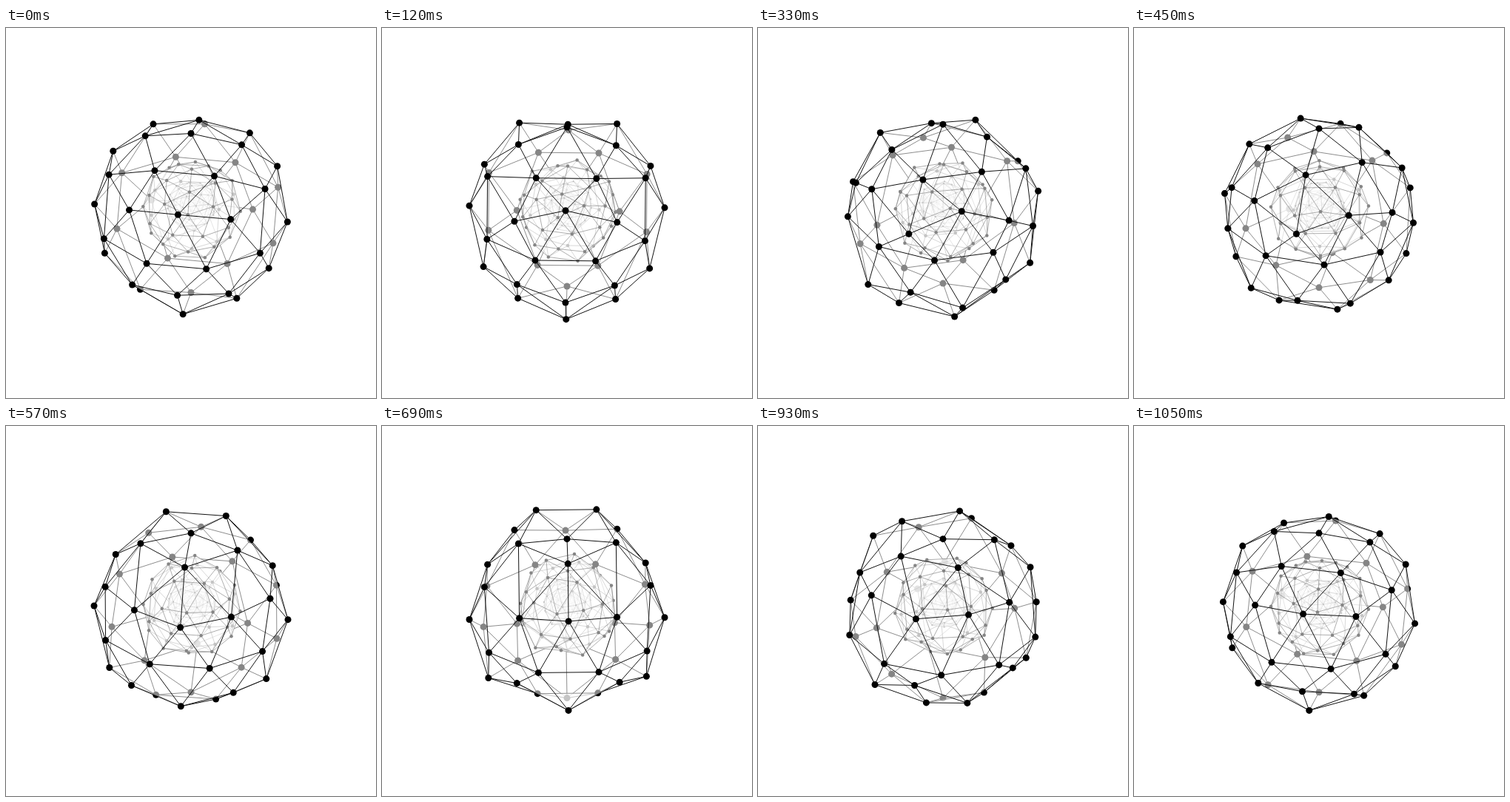
An HTML page with a canvas for the animation above (1.08 s loop, 500 by 500 pixels).

```html
<!DOCTYPE html>
<html>
<head>
<meta charset="utf-8">
<style>
  html, body { margin: 0; background: #fff; overflow: hidden; }
  canvas { display: block; }
</style>
</head>
<body>
<canvas id="stage" width="500" height="500"></canvas>
<script>
const ctx = document.getElementById('stage').getContext('2d');
const RAD = Math.PI / 180, STEP = 30, STEPS = 36;
const TILT = 35.5 * RAD, RADIUS = 132, WAVE = 13.2;

// Rings of a subdivided icosahedron: height, count, first azimuth, bob phase
const rings = [
  [1, 1, 0, 0], [-1, 1, 0, 0], [0, 10, 18, 0],
  [0.5257, 5, 0, 25], [-0.5257, 5, 36, 25],
  [0.8507, 5, 36, 205], [-0.8507, 5, 0, 205],
  [0.4472, 5, 36, 160], [-0.4472, 5, 0, 160]
];
const verts = rings.flatMap(([h, n, first, phase]) =>
  Array.from({ length: n }, (_, i) =>
    ({ h, r: Math.sqrt(1 - h * h), az: first + i * 360 / n, phase })));

function near(a, b) {
  const turn = Math.cos((a.az - b.az) * RAD);
  return a.h * b.h + a.r * b.r * turn > 0.77;
}

const edges = [], faces = [];
verts.forEach((a, i) => {
  for (let j = i + 1; j < verts.length; j++) {
    if (!near(a, verts[j])) continue;
    edges.push([i, j]);
    for (let k = j + 1; k < verts.length; k++)
      if (near(a, verts[k]) && near(verts[j], verts[k])) faces.push([i, j, k]);
  }
});

function project(v, s, spin, wave) {
  const a = (v.az + spin) * RAD, c = v.r * Math.cos(a);
  const up = v.h * Math.cos(TILT) - c * Math.sin(TILT);
  return {
    x: s.x + s.size * RADIUS * v.r * Math.sin(a),
    y: s.y - s.size * (RADIUS * up + WAVE * Math.sin((wave + v.phase) * RAD)),
    z: s.size * (v.h * Math.sin(TILT) + c * Math.cos(TILT)),
    top: -9
  };
}

function trace(points) {
  ctx.beginPath();
  points.forEach(p => ctx.lineTo(p.x, p.y));
}

// Collects drawable parts; edges and dots lie just above their nearest face
function addSphere(parts, s, step) {
  const spin = s.start + s.dir * 2 * step;
  const pts = verts.map(v => project(v, s, spin, step * 10));
  const tops = {};
  for (const f of faces) {
    const tri = f.map(i => pts[i]);
    const z = (tri[0].z + tri[1].z + tri[2].z) / 3;
    for (const [i, j] of [[f[0], f[1]], [f[1], f[2]], [f[0], f[2]]]) {
      const key = i + '-' + j;
      tops[key] = Math.max(tops[key] ?? -9, z);
    }
    tri.forEach(p => p.top = Math.max(p.top, z));
    parts.push({ z, draw() {
      trace(tri);
      ctx.fillStyle = 'rgba(255,255,255,.52)';
      ctx.fill();
    } });
  }
  for (const [i, j] of edges) {
    parts.push({ z: tops[i + '-' + j] + 1e-5, draw() {
      trace([pts[i], pts[j]]);
      ctx.lineWidth = Math.sqrt(s.size);
      ctx.strokeStyle = '#111';
      ctx.stroke();
    } });
  }
  for (const p of pts) {
    parts.push({ z: p.top + 2e-5, draw() {
      ctx.beginPath();
      ctx.arc(p.x, p.y, 4.5 * s.size, 0, 7);
      ctx.fillStyle = '#000';
      ctx.fill();
    } });
  }
}

const spheres = [
  { x: 250, y: 250, size: 1, start: -9, dir: 1 },
  { x: 251, y: 244.5, size: 0.5, start: 31, dir: -1 },
  { x: 251, y: 240, size: 0.25, start: 12, dir: 1 },
  { x: 251, y: 238, size: 0.125, start: 50, dir: -1 }
];

function frame(now) {
  const step = Math.floor(now / STEP) % STEPS;
  const parts = [];
  spheres.forEach(s => addSphere(parts, s, step));
  parts.sort((a, b) => a.z - b.z);
  ctx.fillStyle = '#fff';
  ctx.fillRect(0, 0, 500, 500);
  parts.forEach(p => p.draw());
}

const begin = performance.now();
function loop() {
  frame(performance.now() - begin);
  requestAnimationFrame(loop);
}
loop();
</script>
</body>
</html>
```
